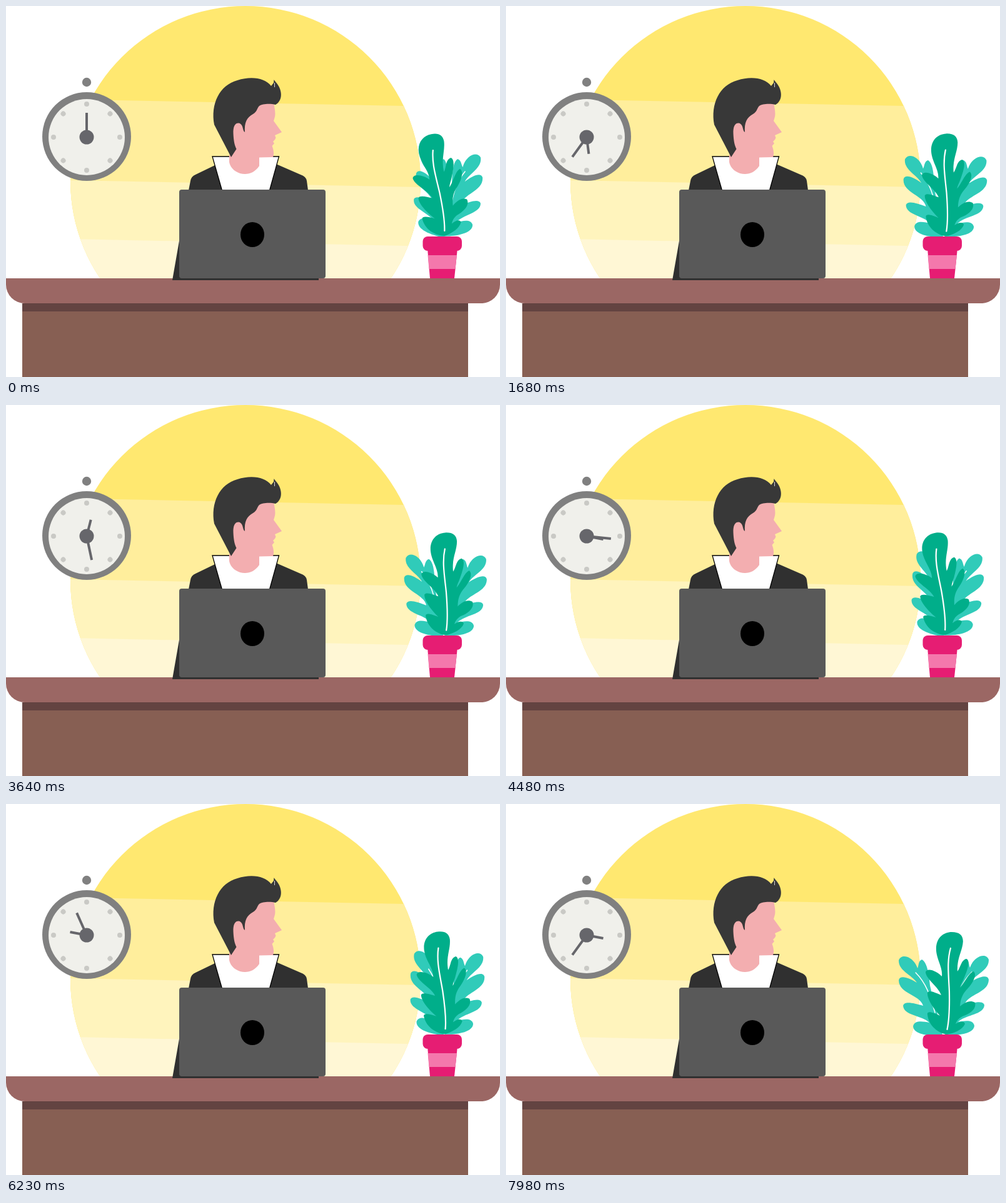
Write an HTML page that moves like this. It is 790 px wide and 594 px high and loops after 8000 ms.

```html
<!DOCTYPE html>
<html lang="en">
<head>
<meta charset="utf-8">
<title>Office desk</title>
<style>
  html, body { margin: 0; width: 100%; height: 100%; overflow: hidden; background: #fff; }
  svg { display: block; width: 100%; height: 100%; }
</style>
</head>
<body>
<svg viewBox="0 0 790 594">
  <defs>
    <clipPath id="horizon"><rect width="790" height="436"/></clipPath>
    <clipPath id="sun"><circle cx="383" cy="280" r="280"/></clipPath>
    <g id="sideLeaf">
      <path fill="#30cbb9" d="M702 369C720 371 748 369 749 355C747 345 734 347 723 349C735 337 764 338 765 322
        C763 314 748 318 733 322C738 304 772 303 772 281C770 272 756 277 743 285C752 272 773 266 772 249
        C767 237 748 244 742 262C740 258 741 250 735 248C727 252 724 270 722 290C715 320 705 350 702 369Z"/>
      <path fill="none" stroke="#fff" stroke-width="1.5" stroke-linecap="round" d="M745 269C728 286 722 305 714 333"/>
    </g>
  </defs>

  <g clip-path="url(#horizon)">
    <g clip-path="url(#sun)">
      <path fill="#ffe870" d="M0 0H790V594H0Z"/>
      <path fill="#ffee9c" d="M103 149.500L663 160.500V594H103Z"/>
      <path fill="#fff4bd" d="M103 279L663 290V594H103Z"/>
      <path fill="#fff7d5" d="M103 373L663 384.500V594H103Z"/>
    </g>
  </g>

  <g id="clock">
    <circle cx="129" cy="122" r="7.200" fill="#808080"/>
    <circle cx="129" cy="209" r="71" fill="#808080"/>
    <circle cx="129" cy="210" r="61" fill="#f0f0eb"/>
    <g id="ticks" fill="#c9c9c5"></g>
    <g stroke="#66666b" stroke-width="4">
      <path id="longHand" d="M129 210V171"/>
      <path id="shortHand" d="M129 210V183"/>
    </g>
    <circle cx="129" cy="210" r="11.500" fill="#66666b"/>
  </g>

  <g id="man">
    <path fill="#303030" d="M292 295L295 280Q296 273 303 270L334 255L346 295ZM432 253L471 270Q480 273 481 280L483 295H421Z"/>
    <path fill="#fff" stroke="#000" stroke-width="1.300" d="M330 241H436.500L421 297H346Z"/>
    <path fill="#f3aeb0" d="M364 182L400 154H428C429 162 432 172 429.500 179L428 184L441 202L430 207L431.500 211L430 214L427 217
      L429 220L425.500 224C428 230 429 237 427 242L405 242.500V256C399 265 391 269 382 269C370 269 359 261 357 250V240Z"/>
    <path fill="#383838" d="M360 242L333 190C327 157 341 127 370 119C392 112 414 115 424 128L428 123L428.500 118L431.500 122
      C440 131 444 147 434 156L431 158C424 156 410 156 405 160C401 164 402 169 395 173C385 179 381 186 382 202
      C378 200 380 191 374 188C367 186 363 192 363.500 204C364 214 365 222 368.500 229Z"/>
    <path d="M429.500 123V130" stroke="#fff" stroke-width=".8"/>
  </g>

  <g id="desk">
    <path fill="#9b6764" d="M0 436H790V446A30 30 0 0 1 760 476H30A30 30 0 0 1 0 446Z"/>
    <path fill="#634341" d="M26 476H739V489H26Z"/>
    <path fill="#875f53" d="M26 489H739V594H26Z"/>
  </g>

  <g id="laptop">
    <path fill="#303030" d="M277 376L266 439H500V430H277Z"/>
    <rect x="277" y="294" width="234" height="142" rx="4" fill="#595959"/>
    <ellipse cx="394" cy="366" rx="19" ry="20"/>
  </g>

  <g id="plant">
    <g id="rightLeaf"><use href="#sideLeaf"/></g>
    <g id="leftLeaf"><use href="#sideLeaf" transform="translate(1400 1) scale(-1 1)"/></g>
    <g id="frontLeaf">
      <path fill="#00ae8a" d="M705 369C692 367 676 356 674 337C673 330 684 334 694 339C684 328 673 312 674 302
        C677 297 688 303 696 306C691 292 672 281 671 269C674 261 690 268 697 276C699 262 688 248 688 232
        C688 214 700 205 713 205C725 205 731 210 731 220C730 236 721 246 722 268C727 262 728 249 737 248
        C743 252 738 266 732 280C730 285 727 289 726 294C734 286 740 270 748 268C754 274 746 288 736 298
        C730 305 727 312 726 324C733 318 742 313 750 318C753 328 742 336 730 340C724 343 721 347 719 352
        C726 348 732 347 734 352C730 362 716 367 705 369Z"/>
      <path fill="none" stroke="#fff" stroke-width="2.200" stroke-linecap="round" d="M711 231C705 252 708 275 709 300C709.500 325 709 345 705.500 361"/>
    </g>
    <path fill="#e61d73" d="M674 388H722L717 436H678Z"/>
    <path fill="#f478ac" d="M674.500 399H721L718.500 421H676.500Z"/>
    <rect x="666.500" y="369" width="62.500" height="23" rx="8" fill="#e61d73"/>
  </g>
</svg>
<script>
const LOOP = 8000, STEP = 70;
const SWAY_STEPS = 75;
const byId = id => document.getElementById(id);
const rotate = (id, angle, x, y) => byId(id).setAttribute('transform', `rotate(${angle} ${x} ${y})`);

byId('ticks').innerHTML = Array.from({ length: 8 }, (_, i) =>
  `<circle cx="129" cy="157" r="4" transform="rotate(${i * 45} 129 210)"/>`).join('');

function draw(time) {
  const step = Math.floor((time % LOOP) / STEP);
  rotate('longHand', step * 24, 129, 210);
  rotate('shortHand', step * 7.2, 129, 210);

  // The leaves are drawn fully spread; sway runs from -1 (closed) to 0 (spread).
  const sway = -(1 + Math.cos(2 * Math.PI * step / SWAY_STEPS)) / 2;
  const swing = (id, degrees) => rotate(id, sway * degrees, 697.5, 383);
  swing('frontLeaf', 10.6);
  swing('rightLeaf', 5.4);
  swing('leftLeaf', -14.8);
}

const start = performance.now();
function tick() {
  draw(performance.now() - start);
  requestAnimationFrame(tick);
}
tick();
</script>
</body>
</html>
```
